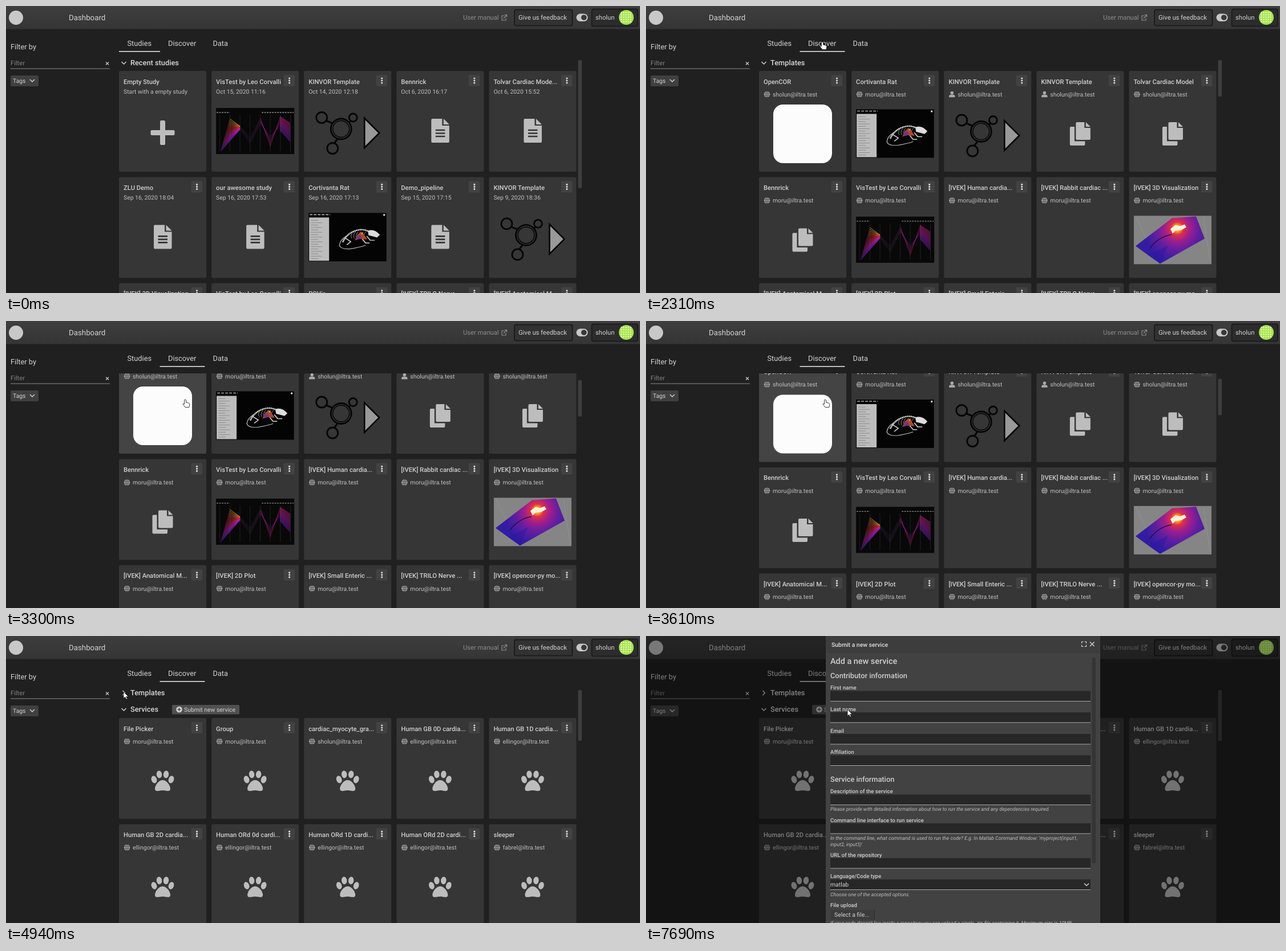
Animation of 1111x504 px, one loop 8000 ms. Source, as an HTML page:

```html
<!DOCTYPE html>
<html lang="en">
<head>
<meta charset="utf-8">
<title>Dashboard</title>
<style>
  html, body { margin: 0; width: 100%; height: 100%; overflow: hidden; background: #202020; }
  svg { display: block; width: 1111px; height: 504px; font-family: Roboto, sans-serif; text-rendering: geometricPrecision; }
  text { white-space: pre; }
  .card { fill: #363636; }
  .card.hover { fill: #444; }
</style>
</head>
<body>
<svg id="stage" viewBox="0 0 1111 504"></svg>
<script>
const LOOP = 8000;
const GREY = '#bdbdbd';

// ---------- drawing helpers ----------
const text = (x, y, size, str, fill = '#d2d2d2', extra = '') =>
  `<text x="${x}" y="${y + size * 0.345}" font-size="${size}" fill="${fill}" ${extra}>${str}</text>`;
const medium = (x, y, size, str, fill = '#cfcfcf') => text(x, y, size, str, fill, 'font-weight="500"');
const rect = (x, y, w, h, fill, extra = '') =>
  `<rect x="${x}" y="${y}" width="${w}" height="${h}" ${fill && `fill="${fill}"`} ${extra}/>`;
const circle = (x, y, r, fill, extra = '') => `<circle cx="${x}" cy="${y}" r="${r}" fill="${fill}" ${extra}/>`;
const line = (d, stroke, width = 1, extra = '') =>
  `<path d="${d}" fill="none" stroke="${stroke}" stroke-width="${width}" ${extra}/>`;
const shape = (d, fill, extra = '') => `<path d="${d}" fill="${fill}" ${extra}/>`;
const group = (x, y, body, id = '') => `<g ${id && `id="${id}"`} transform="translate(${x} ${y})">${body}</g>`;
const range = (n, fn) => Array.from({ length: n }, (_, i) => fn(i)).join('');
const chevron = (x, y, right) =>
  line(right ? `M${x - 2} ${y - 4}l4 4-4 4` : `M${x - 4} ${y - 2}l4 4 4-4`, '#d0d0d0', 1.5);

// ---------- thumbnails, in card coordinates ----------
function plot() {
  const fan = (n, fn) => range(n, i => fn(i / (n - 1)));
  const hue = k => `hsl(${(400 - 130 * k) % 360} 70% ${54 - 10 * k}%)`;
  return rect(0, 0, 137, 81, '#080808')
    + range(8, i => line(`M${6.5 + i * 17.7} 12V76`, '#2c2c2c', 0.7))
    + line('M1 8H24M80 8H136', '#8a8a8a', 1.4, 'stroke-dasharray="3 1.5"')
    + fan(20, k => line(`M${24 - 16 * k} ${19 + 57 * k}L42 ${32 + 6 * k}`, hue(k), 0.8))
    + fan(4, k => line(`M42 ${33 + 4 * k}L60 ${52 + 10 * k} 78 ${18 + 8 * k}`, '#4a2a55', 0.4))
    + fan(7, k => line(`M78 ${18 + 10 * k}L95 ${68 - 18 * k} 112 ${16 + 16 * k}`, hue(0.45 + k / 2), 0.5, 'opacity=".5"'))
    + fan(16, k => line(`M112 ${15 + 24 * k}L130 ${27 + 32 * k}`, hue(0.55 + 0.45 * k), 0.75));
}
function rat() {
  const skeleton = line('M66 46Q55 54 54 66Q56 75 72 74Q88 71 100 66', '#b5b5b5', 1.4)
    + line('M60 59Q66 42 80 35Q94 28 106 36', '#d8d8d8', 3, 'stroke-dasharray="2.500 .7"')
    + line('M64 50L74 58 67 65M102 46L108 55 116 55M94 52L100 61 107 61', '#cfcfcf', 1.8)
    + range(6, i => line(`M${78 + i * 4.5} 36q-6 9-2 15`, '#aaa', 0.9))
    + shape('M86 42l7-6 5 8 5 9-13-1-9 3z', '#b0442e') + shape('M83 48l7-5 3 8-8 2z', '#6c368c')
    + circle(94, 40, 1.8, '#e39a36') + shape('M104 34q11-5 21 9l-5 6-15-5z', '#dcdcdc');
  return rect(0, 0, 136.5, 85, '#040404') + line('M2 3H38', '#aaa', 1.6, 'stroke-dasharray="5 2"')
    + rect(131, 2, 3, 3, '#ddd') + rect(1, 8, 35, 76, '#bcbcbc')
    + range(17, i => line(`M4 ${13 + i * 4.2}h${13 + i * 7 % 14}`, '#808080', 0.8))
    + `<g transform="translate(0 4) scale(1 .8)">${skeleton}</g>`;
}
function surface() {
  return rect(0, 0, 136, 85, '#858585') + line('M42 84L4 2M122 2L134 82', '#999', 0.7)
    + shape('M3 53L67 4 109 1 124 40 46 84 25 69z', 'url(#heat)')
    + shape('M25 69L60 52 46 84z', '#2a18a0', 'opacity=".45"')
    + line('M28 57Q43 37 66 33', '#1c1030', 1.3)
    + shape('M64 23l9-7 8 2 8-3 3 5-9 5-10 1-5 5z', '#fbf3d5');
}
const art = {
  none: () => '',
  plus: () => rect(72, 87, 9, 43, GREY, 'rx="2"') + rect(55.5, 104, 42, 9, GREY, 'rx="2"'),
  file: () => shape('M63 84H80V96H92.5V124Q92.5 126 90.5 126H63Q61 126 61 124V86Q61 84 63 84zM82.5 84L92.5 94H82.5z', GREY)
    + line('M68.5 104H85M68.5 109.5H85M68.5 115H85', '#333', 2.6),
  copy: () => shape('M60.5 98H66.5V123.5H85V129Q85 131 83 131H60.5Q58.5 131 58.5 129V100Q58.5 98 60.5 98z'
    + 'M71 90H84V100H94.5V119Q94.5 121 92.5 121H71Q69 121 69 119V92Q69 90 71 90zM86.5 90L94.5 98H86.5z', GREY),
  paw: () => [[61.5, 108, -18], [70.5, 99, -6], [82.5, 99, 6], [91.5, 108, 18]].map(([x, y, a]) =>
      `<ellipse rx="4.7" ry="6.6" fill="${GREY}" transform="translate(${x} ${y}) rotate(${a})"/>`).join('')
    + shape('M76.5 109C70 109 63 118 63 124C63 131 71 127 76.5 127C82 127 90 131 90 124C90 118 83 109 76.5 109z', GREY),
  nodes: () => line('M38 87L50 92M79 90l3-3M59 119L53 127', '#050505', 3)
    + [[31, 82, 9.5], [86, 82, 7], [50, 136, 9.5], [65, 102, 18]].map(([x, y, r]) => circle(x, y, r, 'none', 'stroke="#050505" stroke-width="2.800"')).join('')
    + circle(65, 102, 14.5, 'none', 'stroke="#050505" stroke-width="1.5"')
    + shape('M106 83L132 109 106 135z', '#999', 'stroke="#050505" stroke-width="2.6"'),
  square: () => rect(25, 59, 103, 103, '#fcfcfc', 'rx="17"'),
  plot: () => group(8, 65, plot()),
  rat: () => group(8, 63, rat()),
  surface: () => group(8.5, 68, surface()),
};

// ---------- cards ----------
const globe = circle(14, 41, 5.3, '#aaa') + line('M9 39.3h10M9 42.7h10M14 36v10', '#3a3a3a', 0.7)
  + '<ellipse cx="14" cy="41" rx="2.4" ry="5.2" fill="none" stroke="#3a3a3a" stroke-width=".7"/>';
const person = circle(14, 38.6, 2.8, '#aaa') + shape('M8.8 46.3v-1.5q0-3 3-3h4.4q3 0 3 3v1.5z', '#aaa');
const menu = rect(126.5, 7, 19.5, 20, '#424242', 'rx="2"') + range(3, i => circle(136.5, 13 + i * 4, 1.6, '#d8d8d8'));
const mail = user => `${user}@iltra.test`;

// owned cards have a taller caption, which pushes fitted pictures down
const fitted = ['nodes', 'plot', 'rat'];

function cards(top, list) {
  return list.map(([title, sub, kind = 'none', icon = ''], i) => {
    const x = 198 + i % 5 * 162.1, y = top + Math.floor(i / 5) * 186.4;
    return rect(x, y, 153, 177, '', 'class="card" rx="2.5"')
      + group(x, y, medium(8, 18.7, 11.2, title)
        + (icon ? icon + text(24, 41.3, 10.4, sub, '#c0c0c0') : text(8, 36.3, 10.4, sub, '#c0c0c0'))
        + group(0, icon && fitted.includes(kind) ? 4.5 : 0, art[kind]()) + (kind === 'plus' ? '' : menu));
  }).join('');
}
const owned = (title, user, kind, icon = globe) => [title, mail(user), kind, icon];

const studies = [
  ['Empty Study', 'Start with a empty study', 'plus'],
  ['VisTest by Leo Corvalli', 'Oct 15, 2020 11:16', 'plot'],
  ['KINVOR Template', 'Oct 14, 2020 12:18', 'nodes'],
  ['Bennrick', 'Oct 6, 2020 16:17', 'file'],
  ['Tolvar Cardiac Mode...', 'Oct 6, 2020 15:52', 'file'],
  ['ZLU Demo', 'Sep 16, 2020 18:04', 'file'],
  ['our awesome study', 'Sep 16, 2020 17:53', 'file'],
  ['Cortivanta Rat', 'Sep 16, 2020 17:13', 'rat'],
  ['Demo_pipeline', 'Sep 15, 2020 17:15', 'file'],
  ['KINVOR Template', 'Sep 9, 2020 18:36', 'nodes'],
  ['[IVEK] 3D Visualization', ''], ['VisTest by Leo Corvalli', ''], ['PCVis', ''],
  ['[IVEK] TRILO Nerve ...', ''], ['[IVEK] Anatomical M...', ''],
];
const templates = [
  owned('OpenCOR', 'sholun', 'square'), owned('Cortivanta Rat', 'moru', 'rat'),
  owned('KINVOR Template', 'sholun', 'nodes', person), owned('KINVOR Template', 'sholun', 'copy', person),
  owned('Tolvar Cardiac Model', 'sholun', 'copy'), owned('Bennrick', 'moru', 'copy'),
  owned('VisTest by Leo Corvalli', 'moru', 'plot'), owned('[IVEK] Human cardia...', 'moru'),
  owned('[IVEK] Rabbit cardiac ...', 'moru'), owned('[IVEK] 3D Visualization', 'moru', 'surface'),
  ...['Anatomical M...', '2D Plot', 'Small Enteric ...', 'TRILO Nerve ...', 'opencor-py mo...'].map(s => owned('[IVEK] ' + s, 'moru')),
];
const services = [
  ['File Picker', 'moru'], ['Group', 'moru'], ['cardiac_myocyte_gra...', 'sholun'],
  ['Human GB 0D cardia...', 'ellingor'], ['Human GB 1D cardia...', 'ellingor'],
  ['Human GB 2D cardia...', 'ellingor'], ['Human ORd 0d cardi...', 'ellingor'],
  ['Human ORd 1D cardi...', 'ellingor'], ['Human ORd 2D cardi...', 'ellingor'], ['sleeper', 'fabrel'],
].map(([title, user]) => owned(title, user, 'paw'));

const heading = (y, label, closed) => chevron(206.5, y, closed) + medium(218, y, 12.8, label, '#d8d8d8');

// ---------- fixed frame ----------
const chrome = rect(0, 0, 1111, 40.5, 'url(#bar)') + circle(17.5, 20.5, 12.5, '#c8c8c8')
  + text(110, 20.5, 13.3, 'Dashboard')
  + text(801, 20.5, 11.2, 'User manual', '#8c8c8c')
  + line('M873 17h-4v8h7v-4M873.5 15.5h4v4M877 16l-5 5.5', '#8c8c8c', 1.2)
  + rect(891, 6.5, 101.5, 28, '#323232', 'rx="3" stroke="#1c1c1c" stroke-width="2"')
  + text(898, 20.5, 11.2, 'Give us feedback')
  + rect(999.5, 13.5, 20, 13.5, '#c8c8c8', 'rx="6.7"') + circle(1012.7, 20.2, 4.8, '#383838')
  + rect(1026.5, 5.5, 80.5, 30, '#2c2c2c', 'rx="3" stroke="#1c1c1c" stroke-width="2"')
  + text(1033, 20.5, 11.2, 'sholun') + circle(1087, 20, 13, '#a6e34c')
  + range(25, i => rect(1077.5 + i % 5 * 4, 10.5 + Math.floor(i / 5) * 4, 2, 2, '#f4ffe4'))
  + text(8, 72, 12.8, 'Filter by') + text(8, 100, 11.2, 'Filter', '#808080')
  + line('M8 110H182', '#8c8c8c') + line('M175 98.5l5 5m0-5l-5 5', '#d0d0d0', 1.1)
  + rect(8, 122, 49, 19, '#404040', 'rx="2"') + text(12, 131.3, 10.4, 'Tags') + chevron(46, 131)
  + text(212.5, 66, 12.8, 'Studies') + text(284, 66, 12.8, 'Discover') + text(362.5, 66, 12.8, 'Data')
  + rect(198, 79, 72, 1.6, '#e0e0e0', 'id="underline"')
  + rect(1002.5, 95, 6.5, 225, '#3e3e3e', 'id="thumb" rx="2"');

// ---------- dialog ----------
const field = (y, label) => medium(323, y, 9.6, label) + rect(323, y + 5.5, 456, 18, '#272727') + line(`M323 ${y + 23.5}H779`, '#a8a8a8');
const note = (y, str) => text(323, y, 8.8, str, '#bdbdbd', 'font-style="italic"');
const dialog = rect(0, 0, 1111, 504, '#000', 'opacity=".4"')
  + rect(315, 0, 481, 504, '#424242') + rect(315, 0, 481, 30, '#3d3d3d')
  + medium(325, 15, 10.4, 'Submit a new service', '#e0e0e0')
  + line('M763.5 13v-3h3M768.5 10h3v3M771.5 15.5v3h-3M766.5 18.5h-3v-3', '#d8d8d8', 1.2)
  + line('M778 10.5l7.5 7.5m0-7.5l-7.5 7.5', '#d8d8d8', 1.3)
  + rect(781.5, 38, 6.5, 361, '#353535', 'rx="2"')
  + medium(323, 44.5, 14.4, 'Add a new service')
  + medium(323, 69.5, 12.8, 'Contributor information')
  + field(91, 'First name') + field(128.5, 'Last name') + field(166.5, 'Email') + field(204, 'Affiliation')
  + medium(323, 252, 12.8, 'Service information')
  + field(273, 'Description of the service')
  + note(304, 'Please provide with detailed information about how to run the service and any dependencies required.')
  + field(323.5, 'Command line interface to run service')
  + note(355, "In the command line, what command is used to run the code? E.g. In Matlab Command Window: 'myproject(input1,")
  + note(365.5, "input2, input3)'")
  + field(384.5, 'URL of the repository')
  + field(422, 'Language/Code type') + text(323, 436.5, 10.4, 'matlab') + chevron(772, 436.5)
  + note(454, 'Choose one of the accepted options.')
  + medium(323, 473, 9.6, 'File upload')
  + rect(323, 481, 77, 17.5, '#3c3c3c') + line('M400.5 481v17.5', '#2c2c2c') + text(330, 489.5, 10.4, 'Select a file...')
  + note(504, "If your code doesn't live inside a repository you can upload a single .zip file containing it. Maximum size is 10MB.");

const stage = document.getElementById('stage');
stage.innerHTML = `<defs>
  <linearGradient id="bar" x2="0" y2="1"><stop stop-color="#3e3e3e"/><stop offset="1" stop-color="#353535"/></linearGradient>
  <radialGradient id="heat" gradientUnits="userSpaceOnUse" cx="76" cy="22" r="75">
    <stop stop-color="#fff0a0"/><stop offset=".07" stop-color="#ffa428"/><stop offset=".15" stop-color="#de3048"/>
    <stop offset=".3" stop-color="#a01e8c"/><stop offset=".5" stop-color="#641ea0"/><stop offset=".8" stop-color="#321ca2"/>
  </radialGradient>
  <clipPath id="view"><rect x="196" y="92" width="806" height="412"/></clipPath></defs>`
  + rect(0, 0, 1111, 504, '#202020') + chrome
  + '<g clip-path="url(#view)">'
  + group(0, 0, heading(100, 'Recent studies') + cards(114, studies), 'studies')
  + group(0, 0, heading(100, 'Templates') + cards(114, templates), 'templates')
  + group(0, 0, heading(100, 'Templates', true) + heading(129, 'Services')
    + rect(291, 121, 118, 16.5, '#505050', 'rx="1.5"') + circle(303.5, 129, 5.3, '#d0d0d0')
    + line('M300.5 129h6M303.5 126v6', '#505050', 1.5) + text(312, 129, 10.4, 'Submit new service')
    + cards(144, services), 'services')
  + '</g>' + group(0, 0, dialog, 'dialog')
  + group(0, 0, '<path id="pointer" fill="#fff" stroke="#111" stroke-width=".8"/>', 'cursor');

// ---------- motion ----------
const HAND = 'M-1.5 .8q1.5-1.8 3 0v4.2l5 1.2q1.6.6 1.3 2.4l-1 4.9h-6.8l-3.8-5q-.6-2 1.2-1.5l1.1 1.2z';
const ARROW = 'M0 0v11.5l2.7-2.4 2 4.2 1.9-.9-2-4h3.8z';
// start, end, steps, then cursor x, cursor y and scroll offset reached
const moves = [
  [310, 1090, 8, 311, 75, 0],
  [1210, 1210, 1, 309, 63, 0],
  [2860, 3080, 3, 314, 138, 0],
  [3190, 3300, 2, 314, 138, 58],
  [3610, 3950, 4, 314, 138, 0],
  [4064, 4410, 4, 206, 98, 0],
  [5490, 5830, 4, 353, 129, 0],
];
const progress = (t, a, b, n) => t < a ? 0 : Math.min(1, (Math.floor((t - a) / (b - a || 1) * (n - 1) + 1e-6) + 1) / n);
const $ = id => document.getElementById(id);
const show = (id, on) => { $(id).style.display = on ? '' : 'none'; };
const set = (id, values) => { for (const k in values) $(id).setAttribute(k, values[k]); };

function render(t) {
  const [x, y, scroll] = moves.reduce((from, [a, b, n, ...to]) => {
    const f = progress(t, a, b, n);
    return from.map((v, i) => v + (to[i] - v) * f);
  }, [890, 500, 0]);
  const page = t < 2310 ? 'studies' : t < 4940 ? 'templates' : 'services';
  for (const id of ['studies', 'templates', 'services']) show(id, id === page);
  show('dialog', t >= 7690);
  show('cursor', t >= 310);
  set('templates', { transform: `translate(0 ${-scroll})` });
  set('underline', page === 'studies' ? { x: 198, width: 72 } : { x: 269.5, width: 79 });
  set('thumb', { y: 95 + scroll * 0.15, height: { studies: 225, templates: 64, services: 89 }[page] });

  let over = false;
  for (const card of $(page).querySelectorAll('.card')) {
    const dx = x - card.getAttribute('x'), dy = y + scroll - card.getAttribute('y');
    const hit = t >= 310 && dx >= 0 && dx < 153 && dy >= 0 && dy < 177;
    card.classList.toggle('hover', hit);
    over = over || hit;
  }
  const hand = over || (t >= 1210 && t < 4630) || (t >= 5830 && t < 7690);
  set('pointer', { d: hand ? HAND : ARROW });
  set('cursor', { transform: `translate(${x} ${y})` });
}
function tick() {
  render(performance.now() % LOOP);
  requestAnimationFrame(tick);
}
tick();
</script>
</body>
</html>
```
